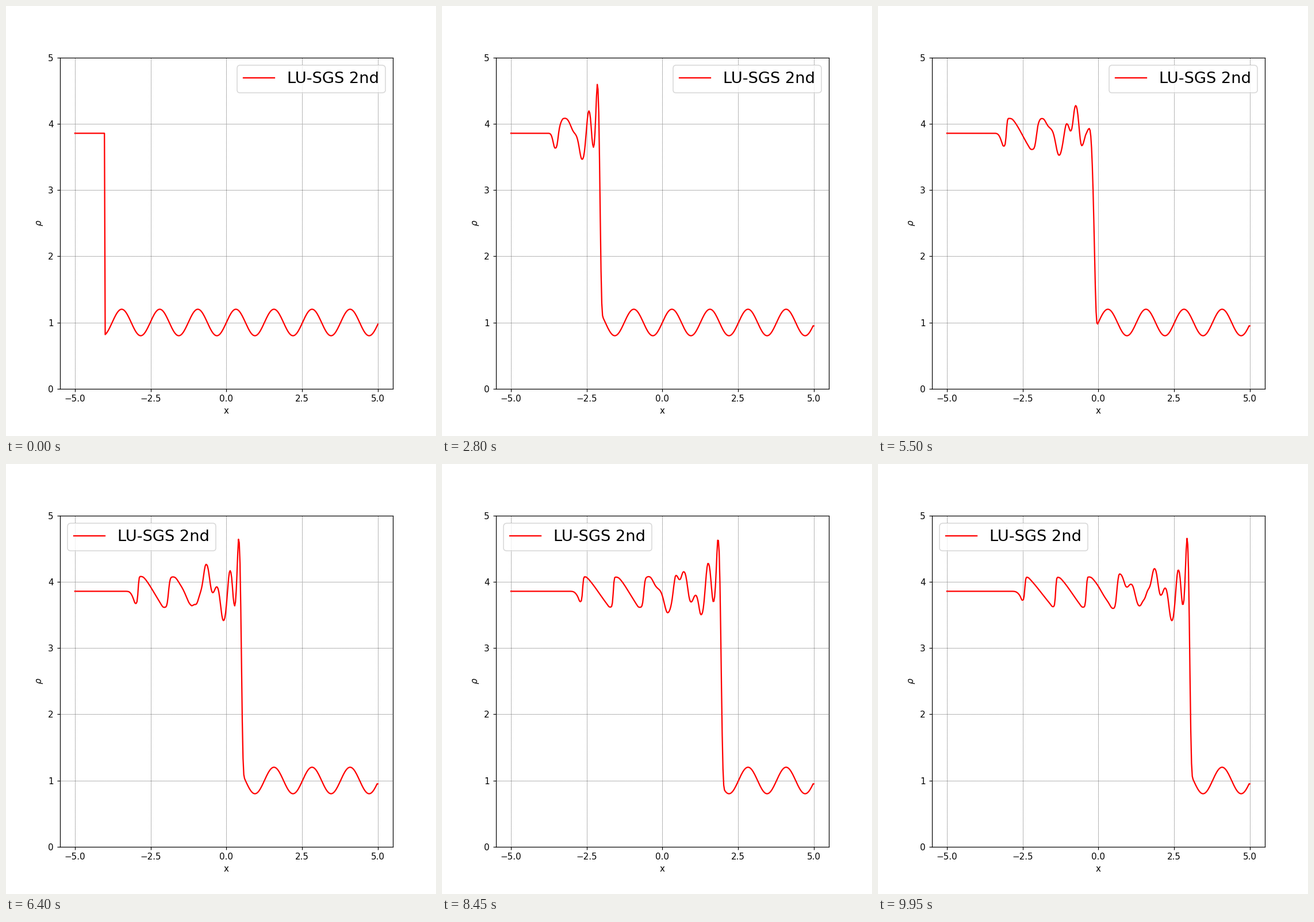
Write a matplotlib script that moves like this. It is 748 by 748 pixels and loops after 10 s.

```python
import numpy as np
import matplotlib.pyplot as plt
from matplotlib.animation import FuncAnimation

# Shock / density-wave interaction: 1D Euler, MUSCL + HLLC, implicit BDF2 in time
GAMMA = 1.4
FRAMES, INTERVAL = 200, 50
DT, SWEEPS, RELAX = 0.01, 40, 0.6
x = np.linspace(-5, 5, 401)
dx = x[1] - x[0]


def conserved(w):
    rho, u, p = w
    return np.array([rho, rho * u, p / (GAMMA - 1) + 0.5 * rho * u * u])


def primitive(q):
    rho = np.maximum(q[0], 0.05)
    u = q[1] / rho
    p = (GAMMA - 1) * (q[2] - 0.5 * rho * u * u)
    return np.array([rho, u, np.maximum(p, 0.05)])


def limited_slope(w):
    """Van Leer limiter."""
    a = w[:, 1:-1] - w[:, :-2]
    b = w[:, 2:] - w[:, 1:-1]
    s = np.zeros_like(w)
    s[:, 1:-1] = 2 * np.maximum(a * b, 0) * np.sign(a) / (np.abs(a + b) + 1e-9)
    return s


def hllc(l, r):
    ql, qr = conserved(l), conserved(r)
    cl, cr = (np.sqrt(GAMMA * w[2] / w[0]) for w in (l, r))
    sl = np.minimum(l[1] - cl, r[1] - cr)
    sr = np.maximum(l[1] + cl, r[1] + cr)
    ml, mr = l[0] * (sl - l[1]), r[0] * (sr - r[1])
    sm = (r[2] - l[2] + ml * l[1] - mr * r[1]) / (ml - mr)

    def side(w, q, s, m):
        f = np.array([q[1], q[1] * w[1] + w[2], (q[2] + w[2]) * w[1]])
        k = m / (s - sm)
        star = np.array([k, k * sm,
                         k * (q[2] / w[0] + (sm - w[1]) * (sm + w[2] / m))])
        return f, f + s * (star - q)

    fl, fls = side(l, ql, sl, ml)
    fr, frs = side(r, qr, sr, mr)
    return np.where(sl >= 0, fl, np.where(sm >= 0, fls, np.where(sr > 0, frs, fr)))


def divergence(q):
    w = primitive(q)
    s = 0.5 * limited_slope(w)
    f = hllc((w + s)[:, :-1], (w - s)[:, 1:])
    return (f[:, 1:] - f[:, :-1]) / dx


def simulate():
    left = x < -4 - 1e-9
    q = conserved(np.array([np.where(left, 3.857143, 1 + 0.2 * np.sin(5 * x)),
                            np.where(left, 2.629369, 0.0),
                            np.where(left, 10.33333, 1.0)]))
    old, out = q.copy(), [q[0].copy()]
    for _ in range(FRAMES - 1):
        new = q.copy()
        rho, u, p = primitive(q)
        speed = np.max(np.abs(u) + np.sqrt(GAMMA * p / rho))
        diag = 1.5 / DT + speed / dx
        for _ in range(SWEEPS):
            rate = (3 * new - 4 * q + old)[:, 1:-1] / (2 * DT)
            new[:, 1:-1] -= RELAX * (rate + divergence(new)) / diag
            new[:, -1] = new[:, -2]
        old, q = q, new
        out.append(q[0].copy())
    return out


density = simulate()

fig, ax = plt.subplots(figsize=(6.875, 6.875), dpi=108.8)
line, = ax.plot(x, density[0], "r-", lw=1.5, label="LU-SGS 2nd")
ax.set_xlim(-5.5, 5.5)
ax.set_ylim(0, 5)
ax.set_xticks(np.arange(-5, 5.1, 2.5))
ax.set_xlabel("x")
ax.set_ylabel(r"$\rho$")
ax.grid(color="black", linestyle=":", linewidth=0.5)
ax.legend(loc="best", fontsize=18)


def update(i):
    line.set_ydata(density[i])
    return line,


anim = FuncAnimation(fig, update, frames=FRAMES, interval=INTERVAL,
                     repeat=True, repeat_delay=0, blit=False)
plt.show()
```
